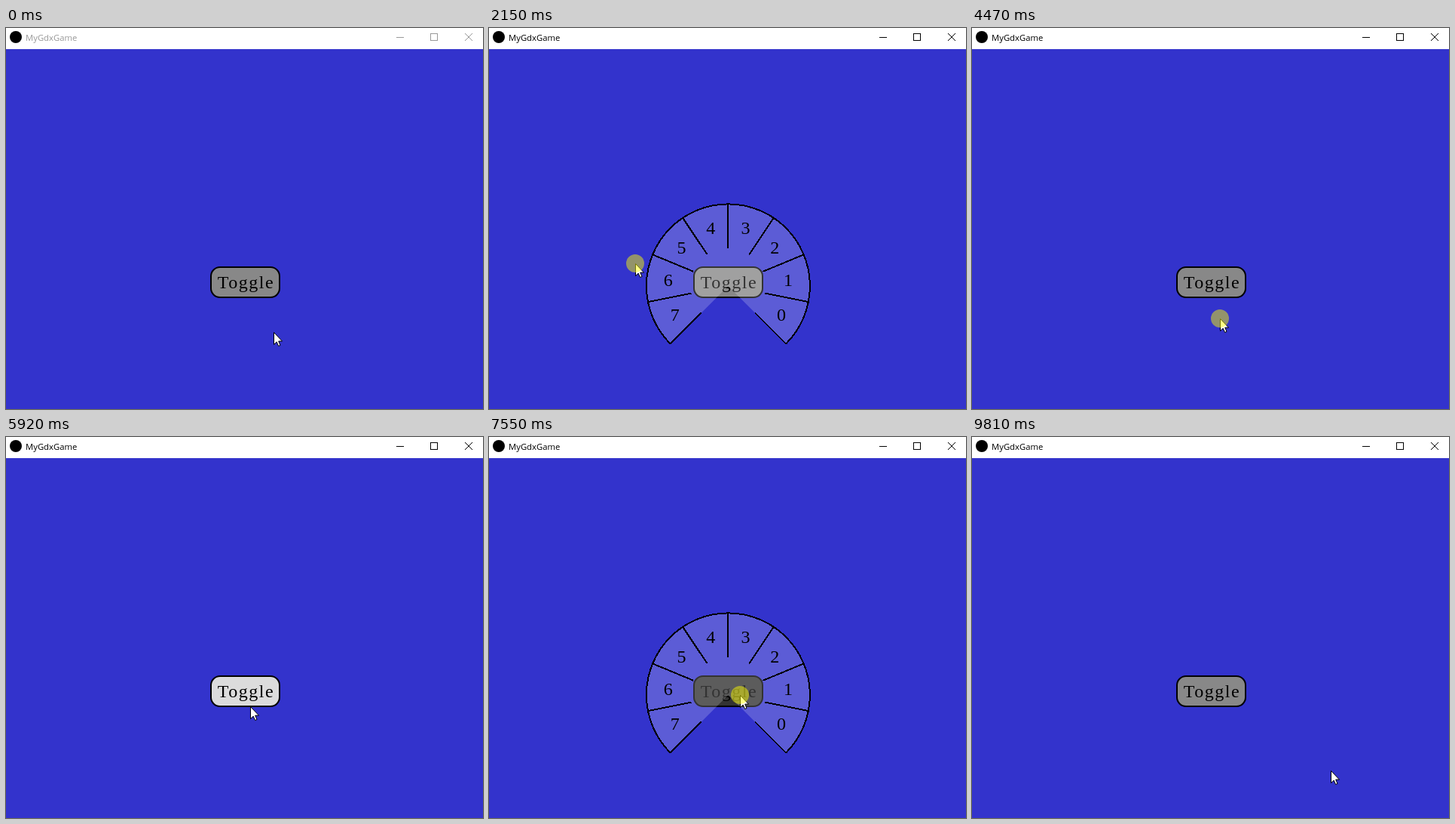
These frames come from a looping animation (633x505 px, 9890 ms). An HTML page:

```html
<!DOCTYPE html>
<html lang="en">
<head>
<meta charset="utf-8">
<title>Pie menu toggle</title>
<style>
  html, body { margin: 0; width: 100%; height: 100%; overflow: hidden; background: #33c; }
  svg { display: block; width: 633px; height: 505px; }
  .title { font: 11.3px "Open Sans", "Noto Sans", sans-serif; }
  .label { font: 24px "Liberation Serif", "Noto Serif", serif; text-anchor: middle; }
  .crisp { shape-rendering: crispEdges; }
</style>
</head>
<body>
<svg viewBox="0 0 633 505">
  <rect width="633" height="505" fill="#33c"/>
  <rect width="633" height="28" fill="#fff"/>
  <circle cx="13" cy="12" r="8"/>
  <g id="bar">
    <text class="title" x="26" y="17" fill="currentColor">MyGdxGame</text>
    <path class="crisp" d="M518 12.5h10M563.5 7.5h9v9h-9z" fill="none" stroke="currentColor"/>
    <path d="M609 7l10 10M619 7l-10 10" stroke="currentColor"/>
  </g>
  <rect id="button" x="272" y="317" width="91" height="40" rx="12" stroke="#000" stroke-width="2"/>
  <text class="label" x="318.5" y="345" letter-spacing="1.5">Toggle</text>
  <g id="pie"></g>
  <g id="pointer">
    <path d="M.5 .5V16.6L4.2 13.1 6.6 18.5 9 17.5 6.7 12.1H11.5Z" fill="#fff" stroke="#000"/>
    <circle id="halo" r="12" fill="#ff0" fill-opacity=".475"/>
  </g>
</svg>
<script>
const LOOP = 9890, TICK = 77;

// Places the pointer travels between
const spot = {
  start: [355, 403], centre: [302, 330], side: [194, 312],
  low: [320, 381], lower: [331, 392], middle: [320, 345],
  inner: [326, 344], right: [333, 342], top: [341, 294], exit: [476, 442]
};

// Each move: first step, last step, destination, sideways bow of the path
const moves = [
  [150, 1000, "centre"],
  [1230, 2150, "side", [0, -57]],
  [2230, 3080, "centre", [115, -150]],
  [3690, 3850, "low"],
  [4000, 4150, "middle"],
  [4320, 4550, "lower"],
  [4630, 5090, "low", [0, -70]],
  [5780, 6070, "inner"],
  [6240, 6470, "low"],
  [6700, 6930, "right"],
  [7720, 8030, "top"],
  [8500, 8730, "right"],
  [8880, 8960, "top"],
  [9110, 9270, "right"],
  [9570, 9810, "exit"]
];

// Times at which a state flips
const focusFlips = [840];
const pressFlips = [840, 920, 1230, 2690, 3460, 3540, 4320, 5550, 7550, 8330];
const pieFlips = [920, 3540, 7250, 9570];

const $ = id => document.getElementById(id);
const isOn = (flips, t) => flips.filter(f => f <= t).length % 2 === 1;
const show = (id, on) => $(id).setAttribute("visibility", on ? "visible" : "hidden");
const ease = u => u * u * (3 - 2 * u);

function pointerAt(t) {
  const i = moves.findLastIndex(m => m[0] <= t);
  if (i < 0) return spot.start;
  const [from, to, name, bow = [0, 0]] = moves[i];
  const a = i ? spot[moves[i - 1][2]] : spot.start;
  const b = spot[name];
  // The pointer is redrawn in steps, the first one already under way
  const gaps = Math.round((to - from) / TICK);
  const step = Math.min(gaps, Math.floor((t - from + 9) * gaps / (to - from)));
  const u = (step + 1) / (gaps + 1);
  return a.map((v, k) =>
    Math.round(v + (b[k] - v) * ease(u) + bow[k] * Math.sin(Math.PI * u)));
}

function buildPie() {
  const cx = 317.4, cy = 341.9, R = 108.5, slices = 8, step = 270 / slices;
  const at = (deg, r) => {
    const a = deg * Math.PI / 180;
    return [(cx + r * Math.cos(a)).toFixed(2), (cy - r * Math.sin(a)).toFixed(2)];
  };
  const arc = `M${at(-45, R)}A${R} ${R} 0 1 0 ${at(225, R)}`;
  let lines = arc, labels = "";
  for (let i = 0; i <= slices; i++) {
    const deg = -45 + i * step;
    lines += `M${at(deg, 50)}L${at(deg, R)}`;
    if (i < slices) {
      const [x, y] = at(deg + step / 2, 80);
      labels += `<text class="label" x="${x}" y="${+y + 8}">${i}</text>`;
    }
  }
  $("pie").innerHTML =
    `<path d="${arc}L${cx} ${cy}Z" fill="#fff" fill-opacity=".2"/>` +
    `<path class="crisp" d="${lines}" fill="none" stroke="#000" stroke-width="2"/>` + labels;
}

function draw(t) {
  const [x, y] = pointerAt(t);
  const over = x >= 271 && x < 364 && y >= 316 && y < 358;
  const down = isOn(pressFlips, t);
  $("pointer").setAttribute("transform", `translate(${x} ${y})`);
  $("button").setAttribute("fill", !over ? "#888" : down ? "#333" : "#dcdcdc");
  $("bar").setAttribute("color", isOn(focusFlips, t) ? "#000" : "#999");
  show("halo", down);
  show("pie", isOn(pieFlips, t));
}

buildPie();
const begin = performance.now();
function tick() {
  draw((performance.now() - begin) % LOOP);
  requestAnimationFrame(tick);
}
tick();
</script>
</body>
</html>
```
